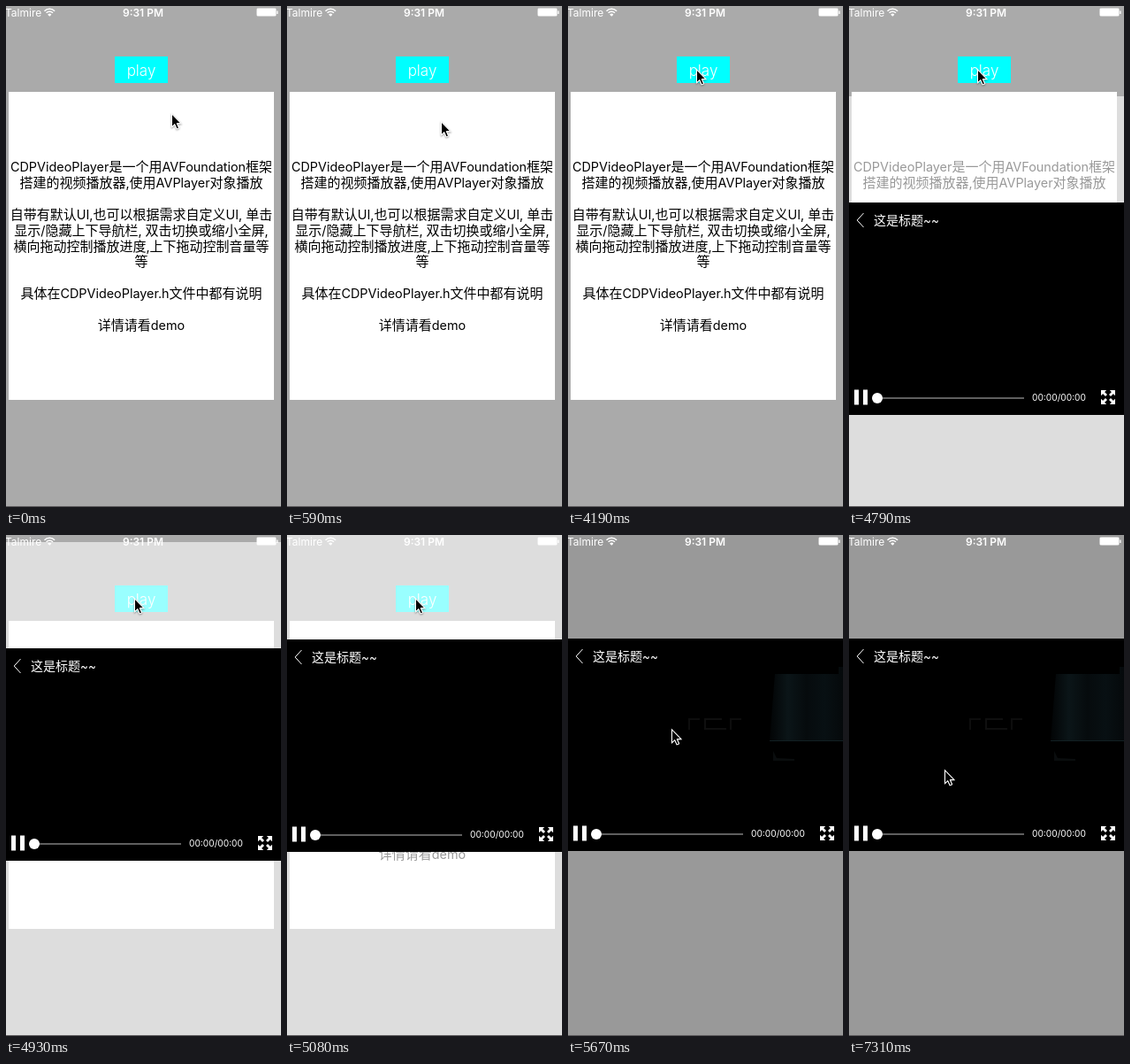
Recreate the animation shown at these times as an HTML page with a canvas. Size 311 by 566 pixels, loop 8 s.

```html
<!DOCTYPE html>
<html lang="zh-CN">
<head>
<meta charset="utf-8">
<title>Video player demo</title>
<style>
html, body { margin: 0; width: 311px; height: 566px; overflow: hidden; background: #aaa; }
canvas { display: block; }
</style>
</head>
<body>
<canvas id="stage" width="311" height="566"></canvas>
<script>
const g = document.getElementById('stage').getContext('2d');
const LOOP = 8000;
const STEP = 149.3; // the picture advances in steps of this many ms
const OPEN = 32, HOME_GONE = 35, VIDEO_ON = 37; // in steps
const LATIN = 'Inter, sans-serif';
const HAN = '"Noto Sans CJK SC", "Noto Sans CJK JP", "Noto Sans CJK", sans-serif';

const intro = `CDPVideoPlayer是一个用AVFoundation框架
搭建的视频播放器,使用AVPlayer对象播放

自带有默认UI,也可以根据需求自定义UI, 单击
显示/隐藏上下导航栏, 双击切换或缩小全屏,
横向拖动控制播放进度,上下拖动控制音量等
等

具体在CDPVideoPlayer.h文件中都有说明

详情请看demo`.split('\n');

// Turning points of the pointer: step, x, y
const route = [
  [0, 187, 121], [2, 187, 122], [4, 174, 130], [18, 174, 130], [19, 174, 128],
  [25, 146, 89], [28, 145, 71], [34, 145, 71], [38, 117, 219], [40, 117, 219],
  [45, 3, 321], [47, 54, 265], [49, 108, 265], [99, 108, 265]
];

function pointerAt(step) {
  const i = route.findIndex(p => p[0] > step);
  const [s0, x0, y0] = route[i - 1], [s1, x1, y1] = route[i];
  const k = (step - s0) / (s1 - s0);
  return [Math.round(x0 + (x1 - x0) * k), Math.round(y0 + (y1 - y0) * k)];
}

function box(color, x, y, w, h) {
  g.fillStyle = color;
  g.fillRect(x, y, w, h);
}

function poly(...pts) {
  g.beginPath();
  for (let i = 0; i < pts.length; i += 2) g.lineTo(pts[i], pts[i + 1]);
}

function stroke(color, width) {
  g.strokeStyle = color;
  g.lineWidth = width;
  g.stroke();
}

function label(text, x, y, size, weight = 400, align = 'left') {
  g.font = `${weight} ${size}px ${LATIN}`;
  g.textAlign = align;
  g.fillText(text, x, y);
}

// Mixed text, with Latin letters slightly smaller than Han ones
function mixed(text, x, y, size, centered) {
  const runs = (text.match(/[\x00-\x7f]+|[^\x00-\x7f]+/g) || []).map(s => {
    const font = s.charCodeAt(0) < 128 ? `${size * 0.96}px ${LATIN}` : `${size}px ${HAN}`;
    g.font = font;
    return { s, font, w: g.measureText(s).width };
  });
  if (centered) x -= runs.reduce((sum, r) => sum + r.w, 0) / 2;
  g.textAlign = 'left';
  for (const r of runs) {
    g.font = r.font;
    g.fillText(r.s, x, y);
    x += r.w;
  }
}

function drawHome() {
  box('#aaa', 0, 0, 311, 566);
  box('#0ff', 123, 57, 60, 30);
  g.fillStyle = '#fff';
  label('play', 153, 79, 17, 300, 'center');
  box('#fff', 3, 97, 300, 348);
  g.fillStyle = '#000';
  intro.forEach((text, row) => mixed(text, 153, Math.round(187 + row * 17.9), 15, true));
}

function drawStatus() {
  g.fillStyle = '#fff';
  label('Talmire', -1, 12, 12);
  label('9:31 PM', 155, 12, 12, 600, 'center');
  for (const r of [8.2, 5.2]) {
    g.beginPath();
    g.arc(49.3, 11.5, r, -2.36, -0.78);
    stroke('#fff', 1.5);
  }
  g.beginPath();
  g.moveTo(49.3, 11.8);
  g.arc(49.3, 11.8, 3, -2.36, -0.78);
  g.fill();
  g.beginPath();
  g.roundRect(283.5, 2.5, 22, 9, 1.8);
  stroke('rgba(255,255,255,.5)', 1);
  box('#fff', 284, 3, 21, 8);
  box('#fff', 306.2, 5.5, 1.3, 3.5);
}

// Dim opening shot of the video
function drawShot(y) {
  const shade = g.createLinearGradient(228, 0, 311, 0);
  ['#020405', '#0b1518', '#060b0d', '#081013', '#05090b']
    .forEach((color, i) => shade.addColorStop(i / 4, color));
  g.fillStyle = shade;
  poly(234, y + 40, 306, y + 40, 306, y + 32, 311, y + 32, 311, y + 116, 228, y + 115);
  g.fill();
  box('#122023', 228, y + 115, 83, 1);
  g.fillStyle = '#0a0d0e';
  poly(232, y + 127, 236, y + 135, 256, y + 136, 256, y + 138, 232, y + 138);
  g.fill();
  // three dim letter-like strokes
  for (const x of [137, 184]) {
    poly(x, y + 103, x, y + 91, x + 12, y + 91);
    stroke('#0d0d0d', 2);
  }
  poly(174, y + 91, 155, y + 91, 155, y + 102, 179, y + 102);
  stroke('#0f0f0f', 2);
}

function drawPlayer(y, playing) {
  box('#000', 0, y, 311, 240);
  if (playing) drawShot(y);
  poly(16.5, y + 12, 9.2, y + 20, 16.5, y + 28);
  stroke('#fff', 1);
  g.fillStyle = '#fff';
  mixed('这是标题~~', 28, y + 25, 14);
  for (const x of [6, 16]) box('#fff', x, y + 211.5, 5, 17);
  box('#777', 32, y + 220.2, 166, 1.6);
  g.fillStyle = '#fff';
  g.beginPath();
  g.arc(32, y + 221, 6, 0, 7);
  g.fill();
  label('00:00/00:00', 207, y + 224, 10.2);
  g.save();
  g.translate(293, y + 220);
  for (let i = 0; i < 4; i++) {
    poly(8, -8, 1.8, -8, 8, -1.8);
    g.fill();
    poly(6, -6, 2, -2);
    stroke('#fff', 2.8);
    g.rotate(Math.PI / 2);
  }
  g.restore();
}

function drawPointer(x, y) {
  g.save();
  g.translate(x + 0.5, y + 1);
  poly(0, 0, 0, 14.6, 3.3, 11.5, 5.6, 16.8, 8, 15.8, 5.7, 10.6, 10.3, 10.6);
  g.closePath();
  g.shadowColor = 'rgba(0,0,0,.45)';
  g.shadowBlur = 2;
  g.shadowOffsetY = 1;
  stroke('#fff', 1.2);
  g.shadowColor = 'transparent';
  g.fillStyle = '#000';
  g.fill();
  stroke('#fff', 1);
  g.restore();
}

function frame(now) {
  const step = Math.floor((now % LOOP + 8) / STEP);
  if (step < HOME_GONE) drawHome();
  else box('#000', 0, 0, 311, 566);
  if (step >= OPEN) {
    // the player screen slides up and settles exponentially
    const rise = Math.round(105 * 0.1 ** (step - OPEN));
    box('rgba(255,255,255,.6)', 0, Math.max(0, rise - 3), 311, 566);
    drawPlayer(117 + rise, step >= VIDEO_ON);
  }
  drawStatus();
  box('#5c5a5c', 0, 565, 311, 1);
  drawPointer(...pointerAt(step));
}

const start = performance.now();
function tick() {
  frame(performance.now() - start);
  requestAnimationFrame(tick);
}
tick();
</script>
</body>
</html>
```
